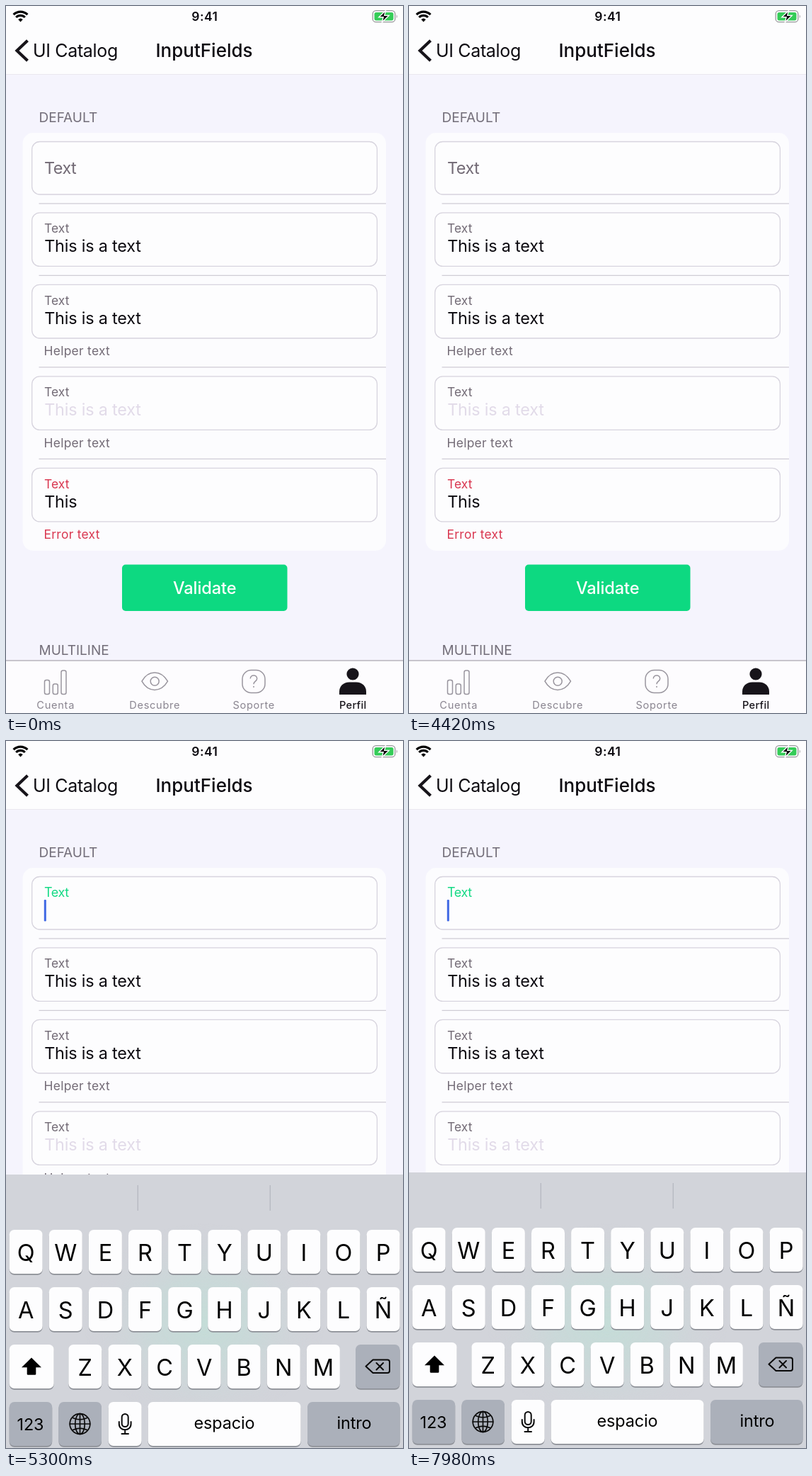
An HTML page that plays this animation: 561 px wide and 998 px high, repeating every 8000 ms.

```html
<!DOCTYPE html>
<html lang="es">
<head>
<meta charset="utf-8">
<title>InputFields</title>
<style>
html, body { margin: 0; width: 100%; height: 100%; overflow: hidden; background: #f5f4fd; }
svg { display: block; width: 561px; height: 998px; font-family: Inter, "Open Sans", sans-serif; }
text { fill: #0d0b11; }
.mid { text-anchor: middle; }
.clock { font-size: 17.5px; font-weight: 600; letter-spacing: .4px; }
.back { font-size: 25px; letter-spacing: -.35px; }
.title { font-size: 26px; font-weight: 500; }
.head { font-size: 19px; fill: #736e79; }
.value { font-size: 23.4px; letter-spacing: -.2px; }
.label { font-size: 17.4px; letter-spacing: .1px; fill: #736b76; }
.help { font-size: 17.4px; letter-spacing: .3px; fill: #736b76; }
.off { fill: #e2dbe9; }
.error { fill: #d9364f; }
.button { font-size: 23.6px; font-weight: 500; letter-spacing: -.1px; fill: #fff; }
.tab { font-size: 14.6px; letter-spacing: .7px; fill: #8a8590; }
.on { font-weight: 500; letter-spacing: .3px; fill: #17141a; }
.key { font-size: 32.5px; fill: #000; }
.word { font-size: 23.4px; letter-spacing: -.1px; fill: #000; }
.thin { fill: none; stroke: #99959e; stroke-width: 1.5; }
.ink { fill: none; stroke: #0a0a0a; stroke-width: 2; stroke-linecap: round; stroke-linejoin: round; }

.keyboard, .glow, .float, .caret { animation: 8s linear infinite; }
.keyboard { animation-name: rise; }
.glow { animation-name: hold; }
.float { animation-name: float; letter-spacing: -.5px; }
.caret { animation-name: blink; }

@keyframes float {
  0% { transform: translate(54px, 237px) scale(1); fill: #736b76; }
  56% { transform: translate(54px, 237px) scale(1); fill: #736b76; animation-timing-function: ease-in-out; }
  62.75%, 100% { transform: translate(54px, 220px) scale(.77); fill: #12d984; }
}
@keyframes blink {
  0%, 55.49% { opacity: 0; }
  55.5%, 68.75% { opacity: 1; }
  71.25%, 72.75% { opacity: 0; }
  75%, 81.25% { opacity: 1; }
  83.75%, 85.25% { opacity: 0; }
  87.5%, 93.75% { opacity: 1; }
  96.25%, 97.5% { opacity: 0; }
  99.75%, 100% { opacity: 1; }
}
</style>
<script>
// Overdamped spring: the share of the way still to go after t seconds.
const slow = 6.1, fast = 19;
const rest = t => (fast * Math.exp(-slow * t) - slow * Math.exp(-fast * t)) / (fast - slow);

const springFrames = (name, height) => {
  const loop = 8000, start = 4440, span = 1560, step = 20;
  const stop = (ms, y) => `${ms / loop * 100}% { transform: translateY(${y.toFixed(2)}px); }`;
  const stops = [stop(0, height)];
  for (let ms = 0; ms < span; ms += step) stops.push(stop(start + ms, height * rest(ms / 1000)));
  stops.push(stop(start + span, 0), stop(loop, 0));
  return `@keyframes ${name} { ${stops.join(" ")} }`;
};

// The glow moves against the keyboard, so it stays in place behind it.
const style = document.createElement("style");
style.textContent = springFrames("rise", 389) + springFrames("hold", -389);
document.head.append(style);
</script>
</head>
<body>
<svg viewBox="0 0 561 998">
  <defs>
    <clipPath id="panel"><path d="M0 609H561V998H0Z"/></clipPath>
    <radialGradient id="green">
      <stop offset="0" stop-color="#c4dcd7"/>
      <stop offset=".45" stop-color="#c8d9d8" stop-opacity=".8"/>
      <stop offset="1" stop-color="#d2d4da" stop-opacity="0"/>
    </radialGradient>
  </defs>

  <rect width="561" height="998" fill="#f5f4fd"/>
  <text class="head" x="46.5" y="164">DEFAULT</text>
  <rect x="23.5" y="179" width="513.5" height="590" rx="15" fill="#fcfcfe"/>
  <g id="fields"></g>
  <text class="value float">Text</text>
  <rect class="caret" x="53.8" y="224" width="3" height="30.5" rx="1.2" fill="#4169e4"/>
  <rect x="164" y="788.5" width="233.5" height="65.5" rx="5" fill="#0dd981"/>
  <text class="button mid" x="280.7" y="830">Validate</text>
  <text class="head" x="46.5" y="916">MULTILINE</text>

  <!-- Navigation and status bar -->
  <rect width="561" height="96" fill="#fdfdfe"/>
  <path d="M0 96.5H561" stroke="#eae8ef"/>
  <path d="M10.6 12.2a14 14 0 0 1 19.8 0M14.2 16a8.8 8.8 0 0 1 12.6 0" fill="none" stroke="#050505" stroke-width="3.2"/>
  <path d="M20.5 22.6l-3.3-3.5a4.8 4.8 0 0 1 6.6 0z" fill="#050505"/>
  <text class="clock mid" x="280.8" y="21">9:41</text>
  <rect x="518.2" y="6.7" width="31.6" height="16" rx="4.5" fill="#fdfdfe" stroke="#98989b" stroke-width="1.3"/>
  <rect x="520.5" y="9" width="27" height="11.4" rx="2.6" fill="#35cc58"/>
  <path d="M551.8 12.2q2 2.5 0 5z" fill="#98989b"/>
  <path d="M536.5 6.5l-9.6 9.3h6.2l-1.8 7.2 9.8-9.6h-6.3z" fill="#050505" stroke="#fdfdfe" stroke-width="1.4"/>
  <path d="M30.5 48.8L15.5 63 30.5 77.2" fill="none" stroke="#17141a" stroke-width="4.2"/>
  <text class="back" x="38" y="72">UI Catalog</text>
  <text class="title mid" x="280" y="71.5">InputFields</text>

  <!-- Tab bar -->
  <rect y="924" width="561" height="74" fill="#fdfcfe"/>
  <path d="M0 924H561" stroke="#b7b4bb" stroke-width="1.4"/>
  <g class="thin">
    <rect x="54.5" y="951.5" width="7" height="20" rx="2.5"/>
    <rect x="66.3" y="957" width="7" height="14.5" rx="2.5"/>
    <rect x="78" y="938" width="7" height="33.5" rx="2.5"/>
    <path d="M192 953.2C201 937 219 937 228.5 953.2 219 969.5 201 969.5 192 953.2Z"/>
    <circle cx="210.2" cy="953.2" r="6"/>
    <rect x="334" y="937.5" width="32" height="32" rx="12.5"/>
    <path d="M345.3 949.6c0-6.2 9.4-6.2 9.4 0 0 3.6-4.7 3.5-4.7 7.6M350 960v2"/>
  </g>
  <g fill="#17141a">
    <circle cx="490" cy="943" r="8.6"/>
    <path d="M471 972v-4c0-8 6-13.5 14-13.5h10c8 0 14 5.5 14 13.5v4z"/>
  </g>
  <g id="tabs"></g>

  <g class="keyboard" clip-path="url(#panel)">
    <rect y="609" width="561" height="389" fill="#d2d4da"/>
    <ellipse class="glow" cx="280" cy="821" rx="170" ry="140" fill="url(#green)"/>
    <path d="M186.3 624V660M373.3 624V660" stroke="#b7bac2" stroke-width="1.4"/>
    <g id="keys"></g>
    <path d="M36 867.5l14 13.8h-7.7v9.2q0 1.3-1.3 1.3h-10q-1.3 0-1.3-1.3v-9.2H22z"/>
    <g class="ink">
      <path d="M518.5 870.5H539q3 0 3 3V886q0 3-3 3H518.5L508.5 879.7ZM523.5 875l9.5 9.5M533 875l-9.5 9.5"/>
      <g stroke-width="1.7">
        <circle cx="104.5" cy="961" r="14.3"/>
        <ellipse cx="104.5" cy="961" rx="6.8" ry="14.3"/>
        <path d="M104.5 946.7V975.3M90.2 961H118.8M94 952.2Q104.5 957.5 115 952.2M94 969.8Q104.5 964.5 115 969.8"/>
      </g>
      <rect x="163.7" y="947" width="9" height="18" rx="4.5"/>
      <path d="M159.8 958v3c0 11 16.8 11 16.8 0v-3M168.2 969.5V975M163.5 975H173"/>
    </g>
  </g>
</svg>
<script>
const byId = id => document.getElementById(id);
const text = (cls, x, y, s) => `<text class="${cls}" x="${x}" y="${y}">${s}</text>`;

const fields = [
  { y: 191.5, h: 74.5 },
  { y: 291.8, value: "This is a text" },
  { y: 393.4, value: "This is a text", help: "Helper text" },
  { y: 522.8, value: "This is a text", help: "Helper text", tone: "off" },
  { y: 652.3, value: "This", help: "Error text", tone: "error" }
];
byId("fields").innerHTML = fields.map(({ y, h = 75.6, value, help, tone = "" }, i) => {
  const note = tone === "error" ? " error" : "";
  let out = `<rect x="36.7" y="${y}" width="487.7" height="${h}" rx="11" fill="#fdfdfe" stroke="#d7d4de" stroke-width="1.3"/>`;
  if (value) {
    out += text("label" + note, 54, y + 28.6, "Text");
    out += text("value" + (tone === "off" ? " off" : ""), 54.2, y + 55.5, value);
  }
  if (help) out += text("help" + note, 53.5, y + 100, help);
  if (i < 4) out += `<path d="M46.5 ${fields[i + 1].y - 13}H537" stroke="#cfccd5" stroke-width="1.3"/>`;
  return out;
}).join("");

byId("tabs").innerHTML = ["Cuenta", "Descubre", "Soporte", "Perfil"]
  .map((s, i) => text(i === 3 ? "tab on mid" : "tab mid", 70.2 + i * 140, 992, s)).join("");

const key = (x, y, w, dark) => {
  const box = `x="${x}" width="${w}" height="62" rx="7"`;
  return `<rect ${box} y="${y + 1.7}" fill="#8d9097"/><rect ${box} y="${y}" fill="${dark ? "#abb0ba" : "#fdfdfe"}"/>`;
};
const row = (letters, x, y) => [...letters].map((c, i) => {
  const left = x + i * 56.1;
  return key(left, y, 47) + text("key mid", left + 23.5, y + 44, c);
}).join("");

byId("keys").innerHTML =
  row("QWERTYUIOP", 4.7, 687) + row("ASDFGHJKLÑ", 4.7, 768) + row("ZXCVBNM", 88.3, 849) +
  key(4.7, 849, 63) + key(494, 849, 62.5, true) +
  key(4.7, 930, 60.5, true) + key(74.5, 930, 60.5, true) +
  key(144.7, 930, 47) + key(200.6, 930, 216) + key(426, 930, 130.5, true) +
  text("word mid", 34.5, 969.5, "123") + text("word mid", 308.5, 968, "espacio") + text("word mid", 492, 968, "intro");
</script>
</body>
</html>
```
